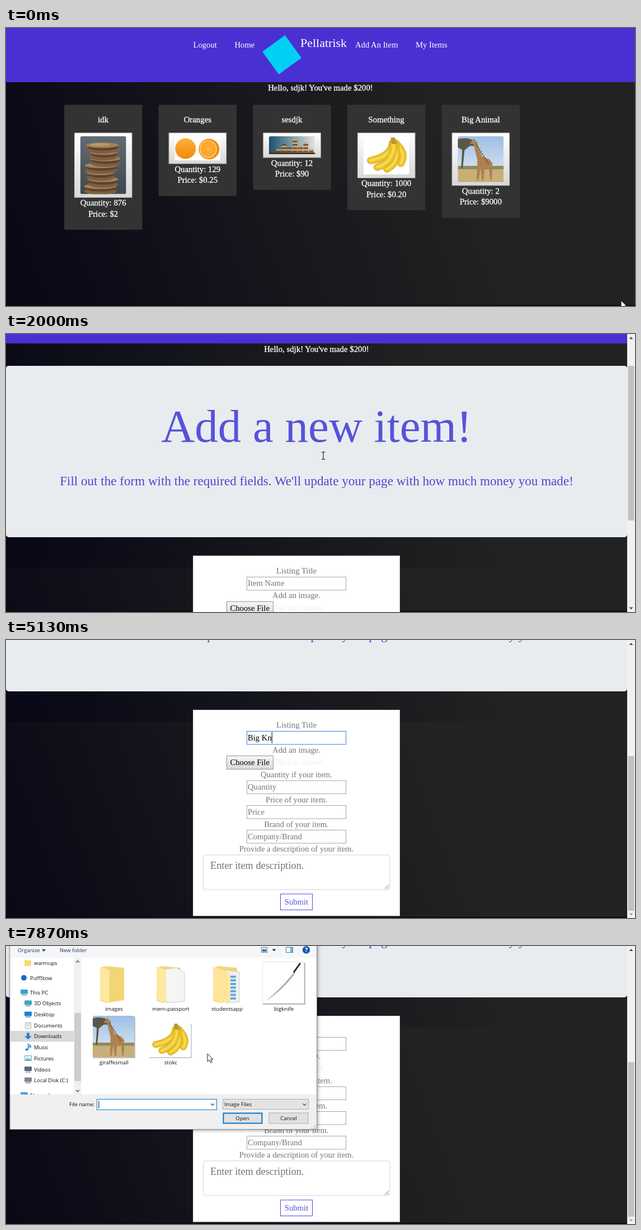
Write an HTML page that moves like this. It is 1124 by 498 pixels and loops after 8 s.

```html
<!DOCTYPE html>
<html lang="en">
<head>
<meta charset="utf-8">
<title>Marketplace demo</title>
<style>
html, body { margin: 0; width: 100%; height: 100%; overflow: hidden; background: #222; }
svg { display: block; }
#stage {
  width: 1124px; height: 498px;
  background: linear-gradient(70deg, #070716, #222 70%) 0 0 / 1124px 498px;
}
text { font: 14.67px "Liberation Serif", serif; fill: #fff; white-space: pre; }
text.ui { font: 9.5px "Open Sans", sans-serif; fill: #111; }
text.strong { font-size: 14.8px; stroke: #fff; stroke-width: .3px; }
</style>
</head>
<body>
<svg id="stage" viewBox="0 0 1124 498"></svg>
<script>
const LOOP = 8000;
const stage = document.getElementById('stage');
const $ = id => document.getElementById(id);

// ---- markup helpers ----
const text = (x, y, s, o = '') => `<text x="${x}" y="${y}" ${o}>${s}</text>`;
const mid = (x, y, s, o = '') => text(x, y, s, `text-anchor="middle" ${o}`);
const strong = (x, y, s) => mid(x, y, s, 'class="strong"');
const ui = (x, y, s, o = '') => text(x, y, s, `class="ui" ${o}`);
const rect = (x, y, w, h, fill, o = '') =>
  `<rect x="${x}" y="${y}" width="${w}" height="${h}" fill="${fill}" ${o}/>`;
const box = (x, y, w, h, fill, line, o = '') =>
  rect(x + .5, y + .5, w - 1, h - 1, fill, `stroke="${line}" ${o}`);
const oval = (x, y, rx, ry, fill) => `<ellipse cx="${x}" cy="${y}" rx="${rx}" ry="${ry}" fill="${fill}"/>`;
const path = (d, fill = 'none', o = '') => `<path d="${d}" fill="${fill}" ${o}/>`;
const use = (id, x, y, w, h) => `<use href="#${id}" x="${x}" y="${y}" width="${w}" height="${h}"/>`;
const group = (id, body, o = '') => `<g id="${id}" ${o}>${body}</g>`;
const symbol = (id, w, h, body) =>
  `<symbol id="${id}" viewBox="0 0 ${w} ${h}" preserveAspectRatio="none">${body}</symbol>`;
const fade = (id, a, b, dir = 'x2="0" y2="1"') =>
  `<linearGradient id="${id}" ${dir}><stop stop-color="${a}"/><stop offset="1" stop-color="${b}"/></linearGradient>`;
const repeat = (n, f) => Array.from({ length: n }, (_, i) => f(i)).join('');

// ---- pictures ----
const cookies = rect(0, 0, 82, 104, 'url(#slate)', 'rx="3"') + repeat(7, i => {
  const x = 36 + i * 1.2 + 4 * Math.sin(i * 1.9), y = 96 - i * 12.5 + (i > 4 ? 1 : 0), r = 29 - i % 3 * 2;
  return oval(x, y + 3, r, 6, '#7d5f3e') + oval(x + 1, y - 2, r - 2, 5.5, '#5e4038') +
    oval(x, y - 6, r, 5, '#a5814f') + oval(x - 4, y - 7, r * .6, 2.5, '#bd9b68');
});
const oranges = rect(0, 0, 82, 43, '#fff', 'rx="3"') + oval(19.5, 22, 18.5, 18.5, 'url(#peel)') +
  oval(61.5, 23, 18.5, 18.5, '#f18a0c') + oval(60, 23, 15.5, 16, '#ffd79a') + oval(60, 23, 14, 14.5, '#fba52a') +
  repeat(5, i => path('M60 10V36', 'none', `stroke="#fdbb5a" stroke-width=".8" transform="rotate(${i * 36} 60 23)"`));
const coins = rect(0, 0, 82, 32, 'url(#dusk)', 'rx="3"') + repeat(8, i => {
  const h = [7, 10, 18, 12, 29, 17, 21, 9][i], x = 3 + i * 9.7;
  return repeat(Math.floor(h / 3), j => rect(x, 29 - j * 3, 9, 2.6, j % 2 ? '#6b4a28' : '#cfa566', 'rx="1"'));
}) + rect(0, 29, 82, 3, '#4b321c');
const bunch = ['M52 12Q50 36 13 43', 'M57 12Q77 30 67 48', 'M56 12Q66 46 42 58', 'M54 12Q56 44 25 55'];
const bananas = rect(0, 0, 82, 68, '#fff', 'rx="3"') + '<g stroke-linecap="round">' +
  bunch.map(d => path(d, 'none', 'stroke="#c9981b" stroke-width="13"') +
    path(d, 'none', 'stroke="#ecc52c" stroke-width="11.5"') +
    path(d, 'none', 'stroke="#f8db55" stroke-width="4"')).join('') + '</g>' +
  path('M49 2L56 2 60 14 50 14Z', '#b89a2c');
const giraffe = rect(0, 0, 82, 82, 'url(#sky)', 'rx="3"') + rect(0, 58, 82, 24, '#c8ae78') +
  rect(0, 53, 82, 6, '#8a8a62') + path('M0 5Q20 0 35 11 37 19 22 17L12 25 9 57 6 57 8 24 0 20Z', '#5b5746') +
  path('M25 8L29 4 33 9 43 36 56 41 62 48 61 78 58 78 56 58 48 55 46 79 43 79 41 56 37 79 34 79 35 42 28 14 21 14Z', '#ae8150') +
  repeat(9, i => oval(34 + i * 2.5, 16 + i * 4, 1.4, 1.7, '#7b5230'));
const blade = rect(0, 0, 75, 75, '#fff', 'stroke="#ccc"') +
  path('M4 72Q34 48 57 18L59 20Q38 50 4 72Z', '#aaadb0') + path('M56 19L68 2', 'none', 'stroke="#292c30" stroke-width="3"');
const folder = path('M0 5L10 2 43 5V63L12 68 0 64Z', '#f3d577') + path('M0 3L17 9V68L0 62Z', '#ffe8a0');

const defs = `<defs>
  ${fade('slate', '#626c74', '#3f474d')}${fade('peel', '#ffb03b', '#f0890a')}
  ${fade('dusk', '#1a516f', '#dfe4e0', '')}${fade('sky', '#9dbfe6', '#e6ecf1')}
  ${fade('frame', '#fff', '#d8d8d8')}${fade('btn', '#f7f7f7', '#d9d9d9')}
  <filter id="shade" x="-5%" y="-5%" width="110%" height="112%">
    <feDropShadow dx="1" dy="1" stdDeviation="3" flood-opacity=".4"/></filter>
  <clipPath id="pane"><rect x="7" y="21" width="115" height="245"/></clipPath>
  ${symbol('cookies', 82, 104, cookies)}${symbol('oranges', 82, 43, oranges)}
  ${symbol('coins', 82, 32, coins)}${symbol('bananas', 82, 68, bananas)}
  ${symbol('giraffe', 82, 82, giraffe)}${symbol('blade', 75, 75, blade)}
</defs>`;

// ---- shared page head ----
const head = (w, logo) => rect(0, 0, w, 97, '#4a30d3') + `<g transform="translate(${(w - 1124) / 2})">` +
  (logo === 'logoA' ? rect(615.5, 10, 94, 41, '#2d0136', 'rx="8" id="hover"') : '') +
  rect(-25, -25, 50, 50, '#00d0f5', `id="${logo}"`) +
  text(334.5, 35, 'Logout') + text(408.5, 35, 'Home') +
  text(526, 34, 'Pellatrisk', 'style="font-size:22px"') +
  text(624, 35, 'Add An Item') + text(732, 35, 'My Items') +
  strong(562, 112, 'Hello, sdjk! You\'ve made $200!') + '</g>';

// ---- item list ----
const items = [
  ['idk', 'cookies', 103.5, 876, 2], ['Oranges', 'oranges', 43, 129, '0.25'],
  ['sesdjk', 'coins', 32, 12, 90], ['Something', 'bananas', 68.5, 1000, '0.20'],
  ['Big Animal', 'giraffe', 82, 2, 9000]
];
const card = ([name, pic, h, count, price], i) => {
  const x = 104 + i * 168.65, c = x + 69.7, end = 200 + h;
  return rect(x, 137.5, 139.5, h + 120.5, '#333', 'rx="2"') + strong(c, 169, name) +
    rect(x + 18.5, 188, 102.5, h + 12, 'url(#frame)', 'stroke="#bbb"') +
    use(pic, x + 28.7, 194, 82, h) +
    strong(c, end + 14.5, 'Quantity: ' + count) + strong(c, end + 34, 'Price: $' + price);
};
const home = head(1124, 'logoA') + items.map(card).join('') +
  group('status', path('M0 481.5H370Q373 481.5 373 485V498H0Z', '#fff') +
    ui(4, 494, 'localhost:3000/addItem', 'style="fill:#777"'));

// ---- item form ----
const label = (y, s) => mid(519, y, s, 'style="fill:#6c757d"');
const field = (y, hint, id = 'f' + y) => box(430, y, 178, 24.5, '#fff', '#a5a5a5', `id="${id}"`) +
  text(432, y + 16.5, hint, `id="${id}Text" style="fill:#757575"`);
const form = head(1110, 'logoB') + rect(0, 137, 1110, 307, '#e9ecef', 'rx="5"') +
  mid(555, 273, 'Add a new item!', 'style="font-size:83px;fill:#5753d9"') +
  mid(555, 351, "Fill out the form with the required fields. We'll update your page with how much money you made!",
    'style="font-size:23.1px;fill:#4f46d6"') +
  box(334, 477, 370, 369.5, '#fff', '#d5d7e4') +
  label(509, 'Listing Title') + field(515, 'Item Name', 'name') + rect(432, 517, 1, 20, '#000', 'id="caret"') +
  label(553.5, 'Add an image.') + box(394, 559, 84, 25, 'url(#btn)', '#949494', 'id="choose"') +
  text(400.5, 576, 'Choose File', 'style="fill:#000"') + text(481.5, 576, 'No file chosen', 'style="fill:#eee"') +
  label(598, 'Quantity if your item.') + field(603.5, 'Quantity') +
  label(642.5, 'Price of your item.') + field(648, 'Price') +
  label(686.5, 'Brand of your item.') + field(692, 'Company/Brand') +
  label(731, 'Provide a description of your item.') + box(352, 736.5, 334.5, 63, '#fff', '#ced4da', 'rx="4"') +
  text(365, 762, 'Enter item description.', 'style="font-size:18.33px;fill:#6c757d"') +
  path('M677 797.5L684 790.5M681.5 797.5L684 795', 'none', 'stroke="#666"') +
  box(490, 806.5, 58, 29.5, '#fff', '#5048da') + mid(519, 826, 'Submit', 'style="fill:#5852d8"');
const scrollbar = rect(1110, 0, 14, 498, '#f1f1f1') + rect(1111.5, 0, 11, 277, '#c1c1c1', 'id="thumb"') +
  path('M1113.5 9L1117 5 1120.5 9Z', '#505050') + path('M1113.5 489.5L1117 493.5 1120.5 489.5Z', '#505050', 'id="down"');

// ---- file dialog ----
const places = [
  [33, 30, 'warmups', '#f8d775'], [26, 57, 'PuffStow', '#0f6cbd'], [26, 83, 'This PC', '#3aa0dc'],
  [33, 102.5, '3D Objects', '#35a9c4'], [33, 122.5, 'Desktop', '#1583d7'], [33, 142, 'Documents', '#9aaab5'],
  [33, 161.5, 'Downloads', '#2583d6'], [33, 181.5, 'Music', '#1c86dc'], [33, 201, 'Pictures', '#67b4df'],
  [33, 221, 'Videos', '#59697a'], [33, 240.5, 'Local Disk (C:)', '#7c8790'], [26, 267, 'Network', '#4b9ed1']
];
const icon = (x, y, name, c) => {
  const shapes = {
    PuffStow: oval(6, 0, 5, 5, c),
    Downloads: path('M4 -6H9V0H13L6.5 6 0 0H4Z', c),
    Music: path('M5 -6L11 -3V0L6.5 -2V4', 'none', `stroke="${c}" stroke-width="1.6"`) + oval(4, 4, 2.6, 2, c),
    Documents: box(1, -5, 11, 11, '#fff', c) + path('M3 -2H10M3 1H10', 'none', `stroke="${c}"`),
    Pictures: box(0, -5, 13, 10, '#e7f4fb', '#8aa') + path('M1 4L5 -1 8 2 10 0 12 4Z', c),
    warmups: path('M0 -5H5L6 -4H12V6H0Z', c)
  };
  return `<g transform="translate(${x} ${y})">${shapes[name] ||
    rect(0, -5, 13, 8, c, 'rx="1"') + rect(2, 4, 9, 1.5, '#7b8c98')}</g>`;
};
const place = ([x, y, name, c]) => icon(x, y, name, c) + ui(x + 17, y + 3.5, name);
const fileName = (x, y, s) => mid(x, y, s, 'class="ui"');
const dir = (x, inside = '') => `<g transform="translate(${x} 34)">${folder}${inside}</g>`;
const chevron = (x, y, k = 1) =>
  path(`M${x - 3} ${y - 1.5 * k}L${x} ${y + 1.5 * k} ${x + 3} ${y - 1.5 * k}`, 'none', 'stroke="#444" stroke-width="1.2"');
const dialog = rect(7, -60, 548.5, 388.5, '#f0f0f0', 'stroke="#8a8a8a" filter="url(#shade)"') +
  rect(7.5, -59, 547.5, 80, '#f5f6f7') + ui(21, 10.5, 'Organize', 'style="fill:#1e395b"') +
  path('M64 6H71L67.5 10Z', '#1e395b') + ui(96, 10.5, 'New folder', 'style="fill:#1e395b"') +
  box(456, 2, 11, 10, '#d8ecfa', '#708090') + rect(458, 6, 7, 4, '#3478b5') + path('M475.5 5.5H482.5L479 9.5Z', '#333') +
  box(500, 2, 13, 10, '#fff', '#3f7dad') + rect(508, 3, 4, 8, '#75b5df') +
  oval(536.5, 7, 6.7, 6.7, '#0b5cad') + mid(536.5, 11, '?', 'class="ui" style="fill:#fff;font-weight:700;font-size:11px"') +
  rect(7.5, 21, 547.5, 245, '#fff') + rect(7.5, 152, 114, 19.5, '#d9d9d9') +
  group('places', places.map(place).join(''), 'clip-path="url(#pane)"') +
  rect(121.5, 21, 13, 245, '#f0f0f0') + rect(122, 120, 12, 122, '#cdcdcd') + chevron(128, 28, -1) + chevron(128, 259.5) +
  dir(168) + dir(269, path('M9 8L36 5 50 14V65L18 68Z', '#f5f5f5', 'stroke="#ccc"') + path('M0 3L17 9V68L0 62Z', '#ffe8a0')) +
  dir(370, path('M22 9L47 13V66L24 68Z', '#f1f1f1', 'stroke="#ccc"') +
    repeat(7, i => rect(31, 19 + i * 6.5, 10, 4, '#66a9d4')) + path('M0 3L30 15V68L0 62Z', '#ffe49a')) +
  rect(459, 30, 76, 75, '#bbb') + use('blade', 458, 28.5, 75, 74.5) +
  rect(156, 126.5, 75, 74.5, '#bbb') + use('giraffe', 155, 125, 74.5, 74.5) +
  rect(257, 139, 75, 62, '#ccc') + use('bananas', 255.5, 137.5, 75, 61.5) +
  fileName(193, 116, 'images') + fileName(294.5, 116, 'mern-passport') + fileName(395, 116, 'studentsapp') +
  fileName(496.5, 116, 'bigknife') + fileName(193, 212, 'giraffesmall') + fileName(294.5, 212, 'stokc') +
  ui(113, 287, 'File name:') + box(162, 274, 215, 20, '#fff', '#0078d7') + rect(165.5, 277.5, 1, 13, '#000') +
  chevron(369, 284) + box(387, 274, 154, 19, '#e3e3e3', '#adadad') + ui(390, 287, 'Image Files') + chevron(533.5, 284) +
  rect(388.5, 299.5, 69, 18, '#e1e1e1', 'stroke="#0078d7" stroke-width="2"') + fileName(422.5, 311.5, 'Open') +
  box(469.5, 298.5, 71, 20, '#e1e1e1', '#adadad') + fileName(505, 311.5, 'Cancel') +
  repeat(6, i => rect(552 - [0, 3, 0, 6, 3, 0][i], 320 + [0, 3, 3, 6, 6, 6][i], 1.5, 1.5, '#aaa'));

// ---- pointers, hot spot at 0,0 ----
const pointers =
  group('arrow', path('M0 0V14L3.2 11 5.5 16 8 15 5.8 10H10Z', '#fff', 'stroke="#000" stroke-width=".9"')) +
  group('hand', path('M-2 0Q0 -2 1.5 0V6L9 8Q10.5 9 10 12L8 18H0L-5 11Q-5 8 -2 10Z', '#fff', 'stroke="#000" stroke-width=".9"')) +
  group('ibeam', path('M-3 -6.5H-1L0 -5.5 1 -6.5H3M0 -5.5V5.5M-3 6.5H-1L0 5.5 1 6.5H3', 'none', 'stroke="#111" stroke-width="1.1"'));

stage.innerHTML = defs + rect(0, 496, 1124, 2, '#0a0a10') + group('home', home) + group('form', form) +
  group('bar', scrollbar) + group('dialog', dialog) + group('pointer', pointers);

// ---- timeline ----
const smooth = u => u * u * (3 - 2 * u);
const linear = u => u;
// keys are [time, value, ...]; returns the values at t
const track = (keys, t, ease) => {
  const i = keys.findIndex(k => k[0] > t);
  if (i < 0) return keys.at(-1).slice(1);
  if (!i) return keys[0].slice(1);
  const a = keys[i - 1], b = keys[i], u = ease((t - a[0]) / (b[0] - a[0]));
  return a.slice(1).map((v, n) => v + (b[n + 1] - v) * u);
};
const moves = [
  [0, 1099, 488], [870, 687, 36], [1370, 687, 36], [1760, 567, 218], [2960, 567, 218], [3330, 533, 184],
  [3760, 533, 184], [3810, 534, 188], [5930, 534, 188], [6350, 450, 215], [7100, 450, 215],
  [7600, 490, 178], [7870, 360, 193]
];
const scrolls = [[1760, 0], [2000, 80], [2200, 100], [2330, 171.5], [2600, 352]];
const word = 'Big Knife';
const keyTimes = [4400, 4530, 4670, 4730, 4930, 5130, 5270, 5330, 5400];

const show = (id, on) => $(id).style.display = on ? '' : 'none';
const within = (x, y, l, t, r, b) => x >= l && x <= r && y >= t && y <= b;

function draw(t) {
  const onForm = t >= 1330, inDialog = t >= 6800;
  const [x, y] = track(moves, t, smooth);
  const scroll = track(scrolls, t, linear)[0];

  show('home', !onForm);
  show('form', onForm);
  show('bar', onForm);
  stage.style.backgroundPosition = `0 ${-scroll}px`;
  $('form').setAttribute('transform', `translate(0 ${-scroll})`);
  $('thumb').setAttribute('y', 12.6 + scroll * .555);
  $('down').setAttribute('fill', scroll >= 352 ? '#a3a3a3' : '#505050');
  for (const id of ['logoA', 'logoB'])
    $(id).setAttribute('transform', `translate(493 48) rotate(${t * .018 - 36})`);

  const onLink = !onForm && within(x, y, 615, 10, 709, 51);
  show('hover', onLink);
  show('status', onLink && t >= 930);

  const focus = t >= 3600 && t < 6350;
  const typed = word.slice(0, keyTimes.filter(k => k <= t).length);
  const entry = $('nameText');
  entry.textContent = typed || 'Item Name';
  entry.style.fill = typed ? '#000' : '#757575';
  $('name').setAttribute('stroke', focus ? '#3b7fe0' : '#a5a5a5');
  show('caret', focus && (t < 4130 || t >= 4400 && t < 5930));
  $('caret').setAttribute('x', 432 + (typed && onForm ? entry.getComputedTextLength() : 0));

  const onButton = t > 5930 && !inDialog && within(x, y, 394, 207, 478, 232);
  $('choose').setAttribute('fill', onButton ? '#dedede' : 'url(#btn)');

  show('dialog', inDialog);
  const open = smooth(Math.min(1, Math.max(0, (t - 6780) / 180)));
  $('dialog').style.opacity = open;
  $('dialog').setAttribute('transform', `translate(281 134) scale(${.95 + .05 * open}) translate(-281 -134)`);

  const onText = onForm && !inDialog &&
    (t < 3000 ? y > 137 : t < 5930 || within(x, y, 430, 163, 608, 188));
  $('pointer').setAttribute('transform', `translate(${x} ${y})`);
  show('pointer', t < 3870 || t >= 5930);
  show('hand', onLink);
  show('ibeam', onText);
  show('arrow', !onLink && !onText);
}

const start = performance.now();
function tick() {
  draw((performance.now() - start) % LOOP);
  requestAnimationFrame(tick);
}
draw(0);
requestAnimationFrame(tick);
</script>
</body>
</html>
```
